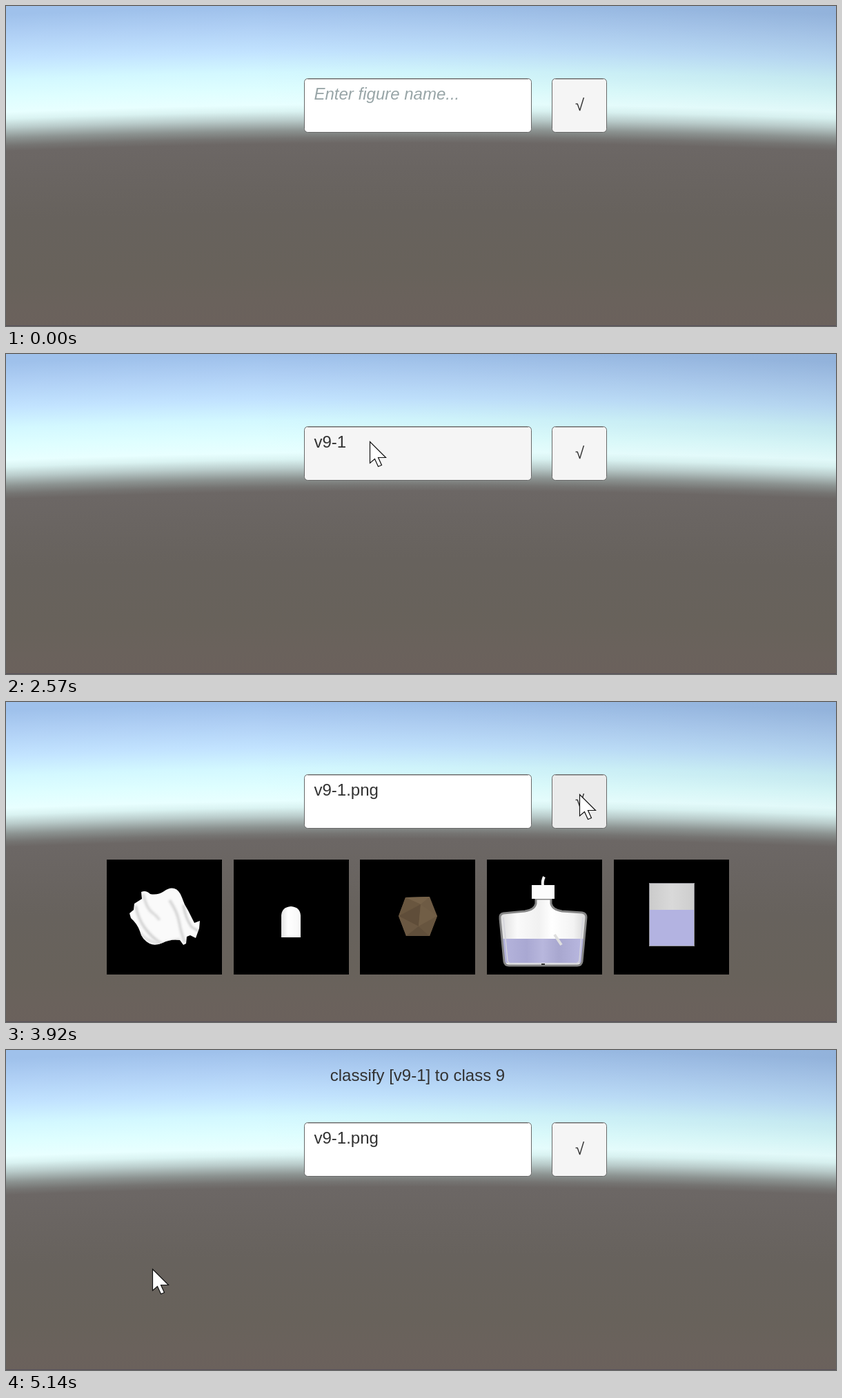
Animation of 1203 by 465 pixels, one loop 5.52 s. Source, as an HTML page with a canvas:

```html
<!DOCTYPE html>
<html lang="en">
<head>
<meta charset="utf-8">
<title>Figure classifier</title>
<style>
html, body { margin: 0; width: 100%; height: 100%; overflow: hidden; background: #6a645f; }
canvas { display: block; }
</style>
</head>
<body>
<canvas id="stage" width="1203" height="465"></canvas>
<script>
const W = 1203, H = 465, LOOP = 5520, STEP = 41;
const stage = document.getElementById('stage').getContext('2d');
const FONT = '24px "Liberation Sans", Arial, sans-serif';

function layer(draw) {
  const canvas = document.createElement('canvas');
  canvas.width = W;
  canvas.height = H;
  draw(canvas.getContext('2d'));
  return canvas;
}

function gradient(c, x0, y0, x1, y1, stops) {
  const g = c.createLinearGradient(x0, y0, x1, y1);
  for (const [at, color] of stops) g.addColorStop(at, color);
  return g;
}

function shape(c, d, fill, stroke, width = 1) {
  const path = new Path2D(d);
  if (fill) { c.fillStyle = fill; c.fill(path); }
  if (stroke) { c.strokeStyle = stroke; c.lineWidth = width; c.stroke(path); }
}

// Sky and ground, drawn in columns so that the horizon curves down at the sides
const scene = layer(c => {
  const air = gradient(c, 0, 0, 0, H, [
    [0, '#9fc1eb'], [30 / H, '#b0d0f5'], [65 / H, '#c2e3ff'], [95 / H, '#d3f8ff'],
    [120 / H, '#defeff'], [142 / H, '#e8ffff'], [152 / H, '#daf3f2'],
    [165 / H, '#b9cbca'], [180 / H, '#8c9391'], [191 / H, '#757472'],
    [199 / H, '#6c6765'], [235 / H, '#6a6562'], [300 / H, '#67625d'],
    [390 / H, '#68625b'], [425 / H, '#6a625c'], [1, '#6b615c']
  ]);
  const shade = gradient(c, 0, 0, 0, 170, [
    [0, 'rgba(70,90,120,.2)'], [.6, 'rgba(100,130,140,.18)'], [1, 'rgba(110,140,140,0)']
  ]);
  for (let x = 0; x < W; x++) {
    const side = (x - W / 2) / (W / 2);
    c.setTransform(1, 0, 0, 1, x, 12 * side * side);
    c.fillStyle = air;
    c.fillRect(0, -12, 1, H + 12);
    c.globalAlpha = Math.max(0, x / W - .3);
    c.fillStyle = shade;
    c.fillRect(0, -12, 1, 182);
    c.globalAlpha = 1;
  }
  c.resetTransform();
  c.fillStyle = '#57515a';
  c.fillRect(0, 464, W, 1);
});

const CLOTH = 'M179 307L185 302L186 293L197 286L196 276Q203 273 209 279Q220 281 229 275' +
  'Q237 269 244 271Q251 273 255 284Q258 294 264 303L273 321L281 318L280 329L275 343' +
  'L267 339L262 341L261 351L257 353L252 346Q239 344 227 350Q216 355 208 351' +
  'Q197 345 194 333Q190 322 181 314Z';

function drawCloth(c) {
  c.save();
  shape(c, CLOTH, '#fafafa');
  c.clip(new Path2D(CLOTH));
  c.filter = 'blur(1.5px)';
  shape(c, 'M188 296Q191 314 201 328T224 350', null, '#d3d3d3', 4);
  shape(c, 'M199 279Q203 299 212 306T222 317', null, '#d9d9d9', 4);
  shape(c, 'M237 288Q248 304 251 320T259 349', null, '#d6d6d6', 4);
  shape(c, 'M257 295Q260 314 269 327L279 333', null, '#c9c9c9', 3);
  shape(c, 'M194 335Q204 349 226 351L252 345', null, '#dedede', 4);
  c.restore();
}

function drawDome(c) {
  shape(c, 'M399 342V310Q400 298 413 297Q426 298 427 310V342Z',
    gradient(c, 399, 0, 427, 0, [[0, '#e3e3e3'], [.35, '#fff'], [1, '#f6f6f6']]));
}

function drawStone(c) {
  shape(c, 'M569 311L579 284L614 283L625 311L614 340L580 340Z', '#6e5b44');
  shape(c, 'M579 284L614 283L601 294Z', '#766249');
  shape(c, 'M569 311L579 284L601 294Z', '#69563f');
  shape(c, 'M569 311L601 294L598 326Z', '#5f4d39');
  shape(c, 'M569 311L598 326L580 340Z', '#6b5842');
  shape(c, 'M598 326L614 340H580Z', '#604f3b');
  shape(c, 'M601 294L625 311L598 326Z', '#715e46');
  shape(c, 'M625 311L614 340L598 326Z', '#67553f');
}

function drawBottle(c) {
  const body = 'M768 286H790V293Q792 302 806 304L835 306Q841 307 841 313L835 377' +
    'Q834 383 828 383H729Q723 383 722 377L716 315Q715 308 721 307L752 304Q766 302 768 293Z';
  shape(c, body, gradient(c, 716, 0, 841, 0, [
    [0, '#dcdcdc'], [.2, '#fafafa'], [.45, '#f1f1f1'], [.6, '#fff'], [.85, '#f3f3f3'], [1, '#d6d6d6']
  ]));
  c.save();
  c.clip(new Path2D(body));
  c.fillStyle = gradient(c, 720, 0, 836, 0, [
    [0, '#b5b4dc'], [.3, '#a9a8d2'], [.5, '#b8b7dd'], [.7, '#a8a7cf'], [1, '#b9b8e0']
  ]);
  c.fillRect(716, 344, 126, 35);
  c.restore();
  shape(c, body, null, '#858585', 3);
  shape(c, 'M721 313L727 376Q728 380 733 380H824Q830 380 831 376L836 313', null, '#d4d4dc', 1.5);
  shape(c, 'M795 338L805 353', null, '#dedede', 4);
  shape(c, 'M776 381H781', null, '#333', 2);
  shape(c, 'M762 266H795V286H762Z', '#fcfcfc');
  shape(c, 'M778 267Q777 260 780 254', null, '#f4f4f4', 4);
}

function drawGlass(c) {
  shape(c, 'M932 263H998V355H932Z', gradient(c, 932, 0, 998, 0,
    [[0, '#cbcbcb'], [.5, '#d9d9d9'], [1, '#cdcdcd']]));
  shape(c, 'M933 302H997V354H933Z', '#b3b3e1');
  shape(c, 'M932.5 263.5H997.5V354.5H932.5Z', null, '#929298');
}

const figures = layer(c => {
  for (let i = 0; i < 5; i++) c.fillRect(Math.round(145.8 + i * 183.7), 229, 167, 167);
  for (const draw of [drawCloth, drawDome, drawStone, drawBottle, drawGlass]) draw(c);
});

// Pointer keys: time, x, y
const pointerKeys = [
  [120, 417, 285], [300, 496, 180], [440, 525, 134], [530, 527, 127],
  [3349, 527, 127], [3350, 550, 127], [3473, 722, 131], [3596, 805, 134], [3719, 831, 134],
  [4449, 831, 134], [4450, 800, 140], [4532, 530, 206], [4614, 270, 284], [4655, 211, 299],
  [4778, 209, 321], [4860, 211, 322], [4983, 212, 318]
];

function pointerAt(t) {
  const start = [4450, 3350, 120].find(s => t >= s);
  if (start === undefined) return null;
  const time = start + Math.floor((t - start) / STEP) * STEP;
  const next = pointerKeys.findIndex(k => k[0] > time);
  if (next < 0) return pointerKeys[pointerKeys.length - 1].slice(1);
  const [ta, xa, ya] = pointerKeys[next - 1], [tb, xb, yb] = pointerKeys[next];
  const f = (time - ta) / (tb - ta);
  return [xa + (xb - xa) * f, ya + (yb - ya) * f];
}

const NAME = 'v9-1.png';
const typedAt = [1230, 1810, 2120, 2270, 2730, 2810, 2960, 3040];
const caretOn = [[420, 690], [960, 1230], [1500, 1810], [1850, 2570], [2810, 3350]];

function box(x, w, fill) {
  stage.beginPath();
  stage.roundRect(x + .5, 105.5, w - 1, 78, 5);
  stage.fillStyle = fill;
  stage.fill();
  stage.strokeStyle = '#686868';
  stage.lineWidth = 1;
  stage.stroke();
  stage.fillStyle = 'rgba(60,60,60,.35)';
  stage.fillRect(x + 5, 106, w - 10, 1);
}

function label(text, x, y, color, align = 'left', style = '') {
  stage.font = style + FONT;
  stage.textAlign = align;
  stage.fillStyle = color;
  stage.fillText(text, x, y);
}

function drawField(t, pointer) {
  const inside = pointer && pointer[1] < 184;
  const active = inside && t < 3760;
  box(432, 330, active ? '#f5f5f5' : '#fff');
  const typed = NAME.slice(0, typedAt.filter(at => t >= at).length);
  if (typed) label(typed, 446.5, 136, '#323232');
  else label('Enter figure name...', 446.5, 136, active ? '#a2a2a2' : '#98a5a7', 'left', 'italic ');
  if (caretOn.some(([from, to]) => t >= from && t < to)) {
    stage.font = FONT;
    stage.fillStyle = '#222';
    stage.fillRect(Math.round(446 + stage.measureText(typed).width * .99), 113, 1.6, 27);
  }
}

function render(t) {
  const pointer = pointerAt(t);
  stage.drawImage(scene, 0, 0);
  drawField(t, pointer);
  box(791, 80, t >= 3760 && t < 4860 ? '#ebebeb' : '#f5f5f5');
  label('√', 831.5, 152, '#323232', 'center');
  if (t >= 3920 && t < 5140) {
    stage.drawImage(figures, 0, 0);
    if (t >= 4614) shape(stage, CLOTH, t < 5020 ? 'rgba(0,0,0,.04)' : 'rgba(0,0,0,.15)');
  }
  if (t >= 5140) label('classify [v9-1] to class 9', 596.5, 45, '#323232', 'center');
  if (pointer) {
    stage.save();
    stage.translate(Math.round(pointer[0]) + .5, Math.round(pointer[1]) + .5);
    shape(stage, 'M0 0V31L7 25L12 36L17 34L12 23H23Z', '#fff', '#111', 1.2);
    stage.restore();
  }
}

const begin = performance.now();
function tick() {
  render((performance.now() - begin) % LOOP);
  requestAnimationFrame(tick);
}
tick();
</script>
</body>
</html>
```
